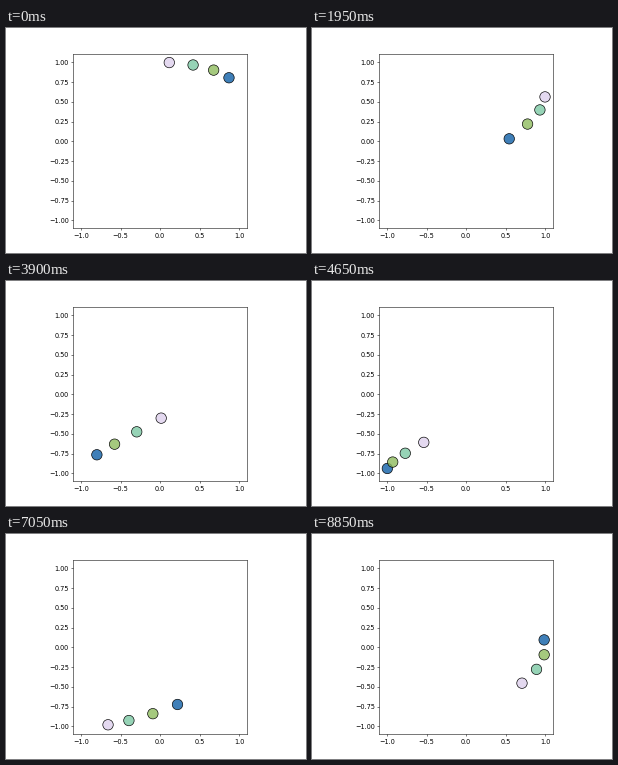
These frames come from a looping animation (300 by 225 pixels, 9 s). A matplotlib script:

```python
import numpy as np
import matplotlib.pyplot as plt
from matplotlib.animation import FuncAnimation
from matplotlib.colors import to_rgb

WIDTH, HEIGHT, DPI = 300, 225, 47
FRAMES = 60
INTERVAL = 150
STEP = 2.25 / 61
LEAD = np.array([0.3, 0.2, 0.1, 0.0])
DOTS = [("#3f7fb8", 0.8), ("#a5c97e", 0.8), ("#96d4b6", 0.8), ("#e4d9f0", 0.35)]

# One clock tick per frame; the final frame lands one tick further on
TICKS = [*range(1, FRAMES), FRAMES + 1]


def positions(frame):
    t = TICKS[frame] * STEP + LEAD
    return np.column_stack([np.sin(np.pi * t), np.cos(0.6 * np.pi * t)])


def see_through(color, alpha):
    """Color that looks like the given one when laid over white."""
    rgb = 1 - (1 - np.array(to_rgb(color))) / alpha
    return (*np.clip(rgb, 0, 1), alpha)


fig, ax = plt.subplots(figsize=(WIDTH / DPI, HEIGHT / DPI), dpi=DPI)

# Default margins of a 6.4 x 4.8 inch figure
grow = 6.4 * DPI / WIDTH
fig.subplots_adjust(left=0.125 * grow, right=0.9 * grow,
                    bottom=0.11 * grow, top=0.88 * grow)
ax.set_aspect("equal")
ax.set(xlim=(-1.1, 1.1), ylim=(-1.1, 1.1),
       xticks=np.linspace(-1, 1, 5), yticks=np.linspace(-1, 1, 9))

dots = ax.scatter(*positions(0).T, s=256, linewidths=1, edgecolors="black",
                  facecolors=[see_through(*dot) for dot in DOTS])


def update(frame):
    dots.set_offsets(positions(frame))
    return dots,


anim = FuncAnimation(fig, update, frames=FRAMES, interval=INTERVAL,
                     repeat=True, repeat_delay=0)
plt.show()
```
